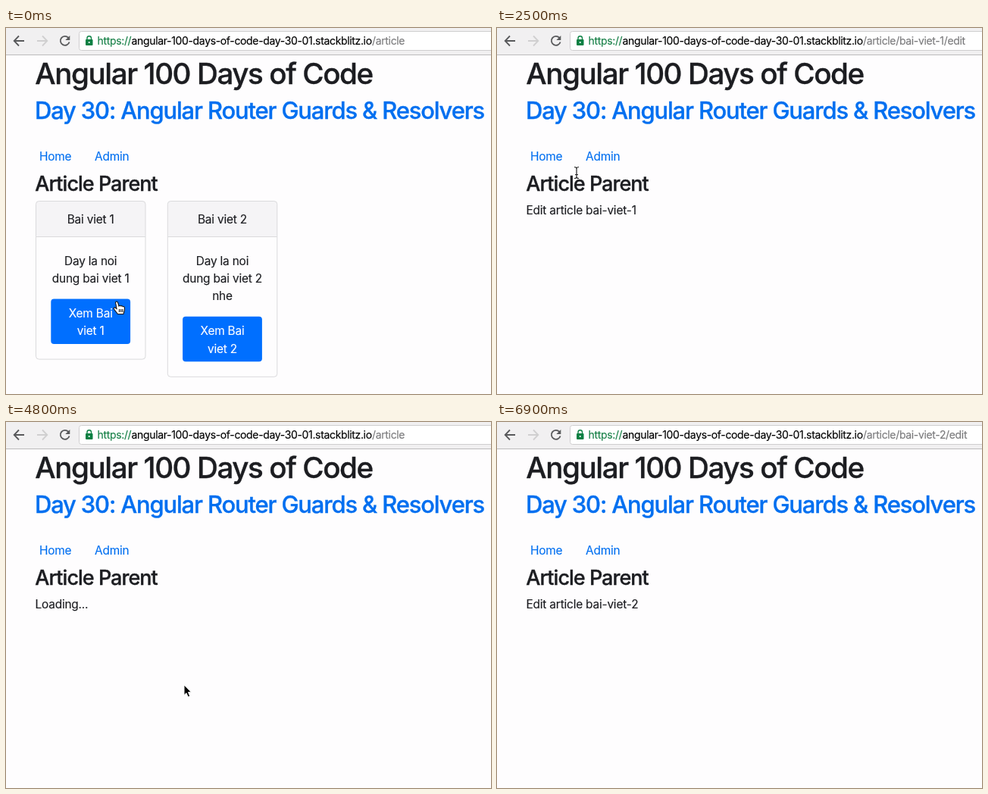
Write an HTML page that moves like this. It is 640 by 483 pixels and loops after 7 s.

```html
<!DOCTYPE html>
<html lang="en">
<head>
<meta charset="utf-8">
<title>Router demo</title>
<style>
  html, body { margin: 0; width: 100%; height: 100%; overflow: hidden; background: #fefdfe; }
  svg { display: block; width: 640px; height: 483px; }
  text {
    font: 400 15.4px Inter, Roboto, sans-serif; font-optical-sizing: none; letter-spacing: -.012em;
    color: #1c1d21; fill: currentColor; stroke: currentColor; stroke-width: .15px;
  }
  .h1, .h2, .h3 { font-weight: 500; letter-spacing: -.0365em; stroke-width: .35px; }
  .h1 { font-size: 38.6px; }
  .h2 { font-size: 30.9px; }
  .h3 { font-size: 27px; }
  .mid { text-anchor: middle; }
  .link { color: #006ff0; }
  .hover { color: #0056b3; text-decoration: underline; }
  .white { color: #fff; }
  .url { font-size: 14px; letter-spacing: -.0245em; }
  .icon { fill: none; stroke: #58595b; stroke-width: 1.8; }
  .border { fill: none; stroke: #dadadc; }
</style>
</head>
<body>
<svg viewBox="0 0 640 483">
  <rect width="640" height="483" fill="#fefdfe"/>

  <rect width="640" height="35" fill="#f1f0f1"/>
  <path d="M0 35.5H640" stroke="#bcbbbc"/>
  <rect x="96.5" y="4.5" width="560" height="25" rx="3" fill="#fff" stroke="#cfcecf"/>
  <path class="icon" d="M24 17H11M17 10.5L10.7 17L17 23.5"/>
  <path class="icon" d="M41 17H54M48 10.5L54.3 17L48 23.5" style="stroke:#d0cfd0"/>
  <path class="icon" d="M82.3 12.8A6 6 0 1 0 83.6 18.5"/>
  <path d="M84.3 10V16H78.3Z" fill="#58595b"/>
  <rect x="105" y="15" width="9.5" height="8" rx="1" fill="#0b8043"/>
  <path d="M107 15.5V13.5A2.75 2.75 0 0 1 112.5 13.5V15.5" fill="none" stroke="#0b8043" stroke-width="1.4"/>
  <circle cx="109.7" cy="19" r="1.1" fill="#fff"/>
  <text class="url" x="120.5" y="22" style="color:#188048">https://</text>
  <text class="url" x="165.5" y="22" style="color:#000">angular-100-days-of-code-day-30-01.stackblitz.io</text>
  <text class="url" x="483" y="22" style="color:#7b7b7d" id="path"></text>

  <text class="h1" x="38.3" y="74">Angular 100 Days of Code</text>
  <text class="h2 link" x="38" y="120">Day 30: Angular Router Guards &amp; Resolvers</text>
  <text class="link" x="44" y="175">Home</text>
  <text class="link" x="117" y="175">Admin</text>
  <text class="h3" x="38.3" y="214.5">Article Parent</text>

  <g id="view"></g>

  <circle id="ring" r="29.5" fill="none" stroke="#111" stroke-width="1.5"/>
  <g id="cursor">
    <path id="arrow" d="M0 0V13.5L3 10.7L5.2 15.8L7.7 14.7L5.5 9.7H9.5Z" fill="#000" stroke="#fff"/>
    <path id="hand" d="M-1.5 1Q0-1 1.5 1L3 6Q4.5 4.5 5.7 6Q7.2 5 8.2 6.7Q10 6 10.5 8L10.3 12L9 16.5H1.5L-3.5 10Q-4.5 7.5-2 8L0 9.5Z
      M3.5 10V14M5.7 10V14M7.9 10V14" fill="#fff" stroke="#111" stroke-width="1.1"/>
    <path id="beam" d="M-3-7.5Q0-7.5 0-5.5Q0-7.5 3-7.5M0-5.5V5.5M-2 2.5H2M-3 7.5Q0 7.5 0 5.5Q0 7.5 3 7.5" fill="none" stroke="#222" stroke-width="1.2"/>
  </g>
</svg>
<script>
const LOOP = 7000, STEP = 100;
const $ = id => document.getElementById(id);
const text = (x, y, str, cls = '') => `<text x="${x}" y="${y}" class="${cls}">${str}</text>`;

function card(x, n, lines) {
  const mid = x + 72.2, button = 311.2 + 23.2 * lines.length;
  return `<rect x="${x}" y="228.5" width="144.5" height="47" rx="4" fill="#f5f4f6"/>
    <rect class="border" x="${x}" y="228.5" width="144.5" height="${button - 149}" rx="4"/>
    <path class="border" d="M${x} 275.5h144.5"/>
    <rect x="${x + 19.8}" y="${button}" width="104.8" height="59.5" rx="4" fill="#006fff"/>` +
    text(mid, 258, 'Bai viet ' + n, 'mid') +
    lines.map((line, i) => text(mid, 313 + 23.2 * i, line, 'mid')).join('') +
    text(mid, button + 24.5, 'Xem Bai', 'mid white') +
    text(mid, button + 47.7, 'viet ' + n, 'mid white');
}

const views = {
  list: () => card(39.5, 1, ['Day la noi', 'dung bai viet 1']) +
    card(213.3, 2, ['Day la noi', 'dung bai viet 2', 'nhe']),
  loading: () => text(38.5, 245.5, 'Loading...'),
  detail: (n, hover) => text(37.8, 266, 'Bai viet ' + n, 'h1') +
    text(38.5, 299.5, 'Day la noi dung bai viet ' + n + (n > 1 ? ' nhe' : '')) +
    text(51, 345, 'Edit', hover ? 'link hover' : 'link'),
  edit: n => text(38.5, 245.5, 'Edit article bai-viet-' + n)
};

// start time, view, article shown, article in the address
const scenes = [
  [0, 'list'], [400, 'loading'], [800, 'detail', 1], [2000, 'edit', 1, 1], [2900, 'loading', 0, 1],
  [3300, 'list'], [4500, 'loading'], [5100, 'detail', 2], [5900, 'edit', 2, 2]
];

// time, x, y, pointer shape from then on
const moves = [
  [0, 146, 361, 'hand'], [400, 146, 361, 'arrow'], [600, 143, 371, 'arrow'], [700, 143, 371, 'arrow'],
  [900, 140, 358, 'arrow'], [1500, 62, 340, 'hand'], [2000, 62, 340, 'arrow'], [2400, 103, 206, 'beam'],
  [2500, 105, 191, 'beam'], [2600, 75, 130, 'arrow'], [2800, 14, 17, 'arrow'], [2900, 14, 17, 'arrow'],
  [3100, 45, 38, 'arrow'], [3500, 106, 305, 'beam'], [3600, 110, 324, 'beam'], [3800, 150, 350, 'arrow'],
  [4200, 238, 394, 'hand'], [4500, 238, 394, 'arrow'], [4700, 237, 378, 'arrow'], [4800, 235, 347, 'arrow'],
  [5500, 54.5, 337.5, 'hand'], [5900, 54.5, 337.5, 'arrow'], [6300, 105, 159, 'arrow'], [6800, 150, -22, 'arrow']
];

const clicks = [200, 1700, 4300, 5600], CLICK_TIME = 200;
const latest = (rows, t) => rows.findLastIndex(row => row[0] <= t);
let shown = '';

function draw(t) {
  const i = latest(moves, t), [t0, x0, y0, shape] = moves[i];
  const [t1, x1, y1] = moves[i + 1] || [LOOP, x0, y0];
  const k = (t - t0) / (t1 - t0);
  const at = `translate(${x0 + (x1 - x0) * k} ${y0 + (y1 - y0) * k})`;
  $('cursor').setAttribute('transform', at);
  $('ring').setAttribute('transform', at);
  for (const name of ['arrow', 'hand', 'beam']) $(name).style.display = name === shape ? '' : 'none';
  $('ring').style.display = clicks.some(c => t >= c && t < c + CLICK_TIME) ? '' : 'none';

  const [, view, n, address] = scenes[latest(scenes, t)];
  const html = views[view](n, shape === 'hand');
  if (html !== shown) $('view').innerHTML = shown = html;
  $('path').textContent = '/article' + (address ? `/bai-viet-${address}/edit` : '');
}

function tick() {
  draw(Math.floor(performance.now() % LOOP / STEP) * STEP);
  requestAnimationFrame(tick);
}
tick();
</script>
</body>
</html>
```
